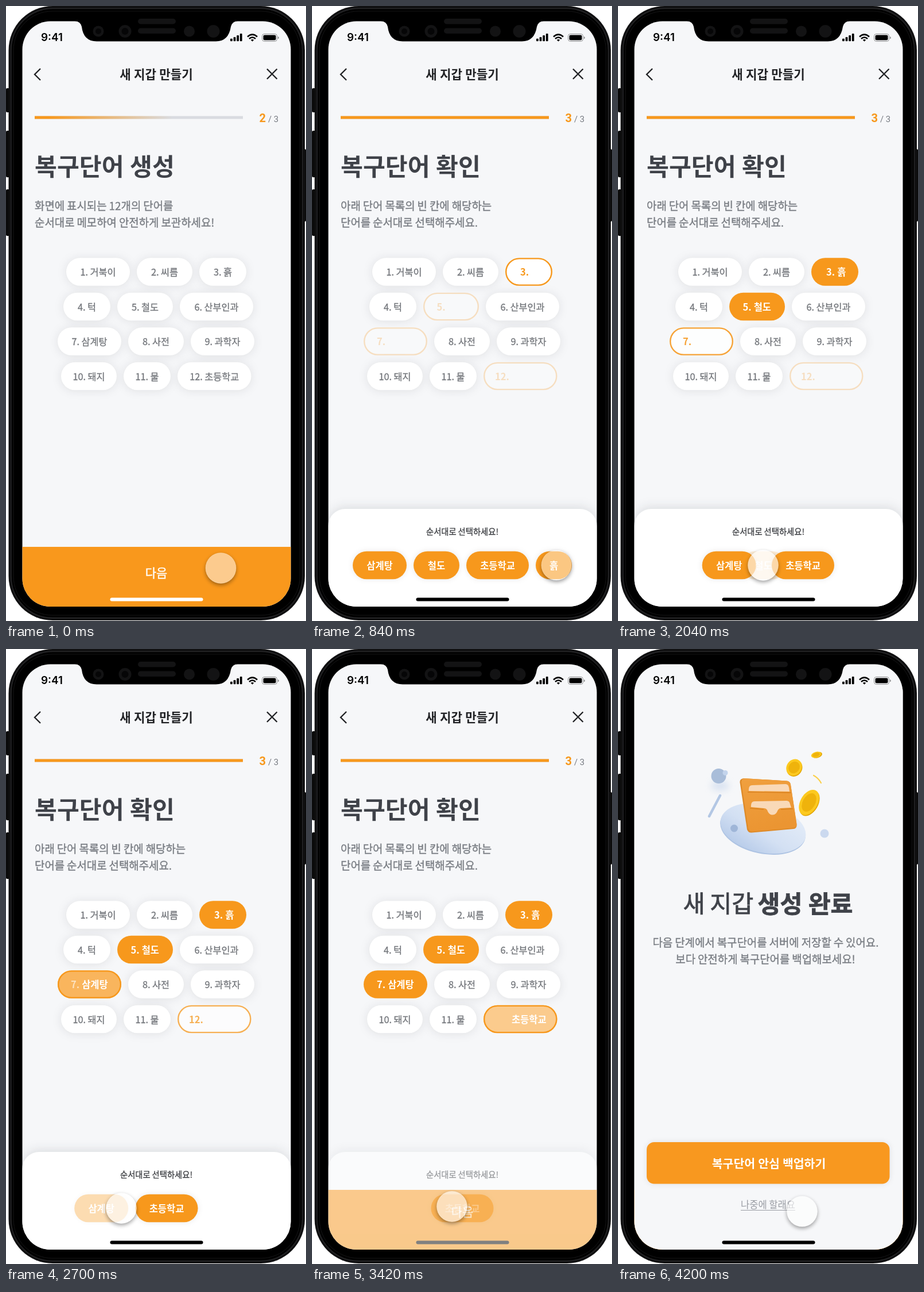
Animation of 523 by 1070 pixels, one loop 6200 ms. Source, as an HTML page:

```html
<!DOCTYPE html>
<html lang="ko">
<head>
<meta charset="utf-8">
<title>새 지갑 만들기</title>
<style>
  html, body { margin: 0; width: 100%; height: 100%; overflow: hidden; background: #fff; }
  svg { display: block; width: 523px; height: 1070px; }
  text { font-family: "Noto Sans CJK KR", "Noto Sans CJK", sans-serif; white-space: pre; word-spacing: -.07em; }
  text[font-weight="700"] { word-spacing: -.035em; }
  .halo { filter: drop-shadow(0 1px 8px rgba(20, 24, 32, .1)); }
  .glow { filter: drop-shadow(0 0 5px rgba(20, 24, 32, .1)); }
  .sheet { filter: drop-shadow(0 -4px 9px rgba(20, 24, 32, .11)); }
</style>
</head>
<body>
<svg viewBox="0 0 523 1070" xmlns="http://www.w3.org/2000/svg">
  <defs>
    <clipPath id="screen"><rect x="28.500" y="26.500" width="468" height="1018.500" rx="49"/></clipPath>
    <linearGradient id="barFill">
      <stop offset=".1" stop-color="#f7981d"/>
      <stop id="barEnd" offset="1" stop-color="#f7981d"/>
    </linearGradient>
    <linearGradient id="disc" x1=".9" y1="0" x2=".2" y2="1">
      <stop offset="0" stop-color="#e6eef9"/><stop offset=".6" stop-color="#d3e0f3"/><stop offset="1" stop-color="#b4c9e8"/>
    </linearGradient>
    <linearGradient id="leather" x2=".3" y2="1">
      <stop offset="0" stop-color="#f0a03f"/><stop offset="1" stop-color="#eb9532"/>
    </linearGradient>
    <filter id="outerShadow" x="-50%" y="-50%" width="200%" height="200%">
      <feGaussianBlur in="SourceAlpha" stdDeviation="3.5"/>
      <feOffset dy="2.5"/>
      <feComposite in2="SourceAlpha" operator="out"/>
    </filter>
    <filter id="soft" x="-100%" y="-100%" width="300%" height="300%"><feGaussianBlur stdDeviation="6"/></filter>
  </defs>

  <!-- phone body -->
  <g fill="#0a0a0a">
    <rect x="0" y="143" width="9" height="42" rx="2"/>
    <rect x="0" y="217" width="9" height="81" rx="2"/>
    <rect x="0" y="319" width="9" height="81" rx="2"/>
    <rect x="514" y="249" width="9" height="126" rx="2"/>
    <rect x="4.500" y="0" width="516.500" height="1069" rx="77" fill="#101011"/>
    <rect x="9" y="4.500" width="507.500" height="1060" rx="72" fill="#000" stroke="#29292b" stroke-width="1.400"/>
    <rect x="13" y="9" width="499.500" height="1051" rx="68" fill="#000" stroke="#161617"/>
  </g>

  <g clip-path="url(#screen)">
    <rect x="28" y="26" width="469" height="1020" fill="#f6f7f9"/>
    <g id="wizard">
      <g fill="none" stroke="#232427" stroke-width="2.400">
        <path d="M60 109L50 119L60 129"/>
        <path d="M455 109.500L472.500 127M472.500 109.500L455 127"/>
      </g>
      <rect x="50" y="191.500" width="363" height="5" fill="#d9dbe0"/>
      <rect id="bar" x="50" y="191.500" height="5" fill="url(#barFill)"/>
      <g id="head"></g>
      <g id="words"></g>
    </g>
    <g id="sheet">
      <path class="sheet" d="M28 1046V905A30 30 0 0 1 58 875H467A30 30 0 0 1 497 905V1046Z" fill="#fff"/>
    </g>
    <g id="next">
      <rect x="28" y="941" width="469" height="105" fill="#f9981c"/>
    </g>
    <g id="done">
      <rect x="28" y="70" width="469" height="976" fill="#f6f7f9"/>
      <g id="art">
        <ellipse cx="178" cy="238" rx="16" ry="9" fill="#cfdbee" opacity=".7" filter="url(#soft)"/>
        <ellipse cx="252.500" cy="314" rx="75.500" ry="42" transform="rotate(12 252.500 314)" fill="#adc3e3"/>
        <ellipse cx="253" cy="312" rx="75.500" ry="42" transform="rotate(12 253 312)" fill="url(#disc)"/>
        <circle cx="175.500" cy="221" r="13" fill="#a9bdd9"/>
        <circle cx="187" cy="215.500" r="4.500" fill="#c3d4ec"/>
        <circle cx="202.500" cy="312" r="6.500" fill="#9fb6d8"/>
        <circle cx="360" cy="321" r="7.500" fill="#cbd9ef"/>
        <path d="M159 291L178 255" stroke="#b3c7e4" stroke-width="4.500" stroke-linecap="round"/>
        <path d="M341 220Q349 224 354 233" fill="none" stroke="#fbd04c" stroke-width="2.200" stroke-linecap="round"/>
        <path d="M219 225L294 229.500Q300 230 301 236L311.500 306Q312 312 306 313L233 319.500Q227 320 225 314L212.500 232Q212 226 219 225Z" fill="#de8a28"/>
        <path d="M221 225L294 229.500Q300 230 301 236L311.500 304Q312 310 306 311L235 317.500Q229 318 227 312L215 232Q215 226 221 225Z" fill="url(#leather)"/>
        <g fill="#f9d9b8">
          <path d="M228 247Q227 237 234 237L292 235Q297 235 298 241L299 248Z"/>
          <path d="M232 275Q231 265 238 265L294 264Q299 264 300 270L302 276L283 277Q279 278 277 284Q273 290 266 288Q262 286 260 280Q258 277 254 277Z"/>
        </g>
        <path d="M226 249L302 250M230 277L254 279M284 279L305 278" stroke="#d98322" stroke-width="1.400" fill="none"/>
        <g id="coins"></g>
      </g>
      <rect class="glow" x="50" y="858" width="423.500" height="72.500" rx="13" fill="#f8981f"/>
    </g>
    <rect id="home" x="181.500" y="1029.500" width="162" height="6" rx="3"/>
    <circle id="shade" filter="url(#outerShadow)" opacity=".38"/>
    <circle id="cursor" fill="#fff" stroke="#fff" stroke-opacity=".3"/>
  </g>

  <!-- notch -->
  <path d="M120 26Q130 27 132 36Q135 61.500 158 61.500H366Q388 61.500 392 36Q394 27 404 26Z"/>
  <g fill="#131314">
    <rect x="230" y="22" width="66" height="9.500" rx="4.700"/><rect x="230" y="38.500" width="66" height="9.500" rx="4.700"/>
    <circle cx="161" cy="44" r="9.500"/><circle cx="207.500" cy="44" r="11"/>
    <circle cx="319.500" cy="44" r="9.500"/><circle cx="361.500" cy="44" r="11"/>
    <g fill="#060607"><circle cx="161" cy="44" r="5"/><circle cx="207.500" cy="44" r="6"/></g>
  </g>

  <!-- status bar -->
  <text x="61" y="61.300" style="font-family:Inter,sans-serif" font-size="18.800" font-weight="600" fill="#000">9:41</text>
  <g id="signal"></g>
  <g fill="none" stroke="#000" stroke-width="2.600">
    <path d="M421 53.500Q429.500 45.800 438 53.500"/><path d="M424 57Q429.500 52 435 57"/>
    <path d="M426.800 59L429.500 61.800L432.200 59Q429.500 57 426.800 59Z" fill="#000" stroke="none"/>
  </g>
  <rect x="446.500" y="48.500" width="26" height="13" rx="4" fill="none" stroke="#000" stroke-opacity=".4"/>
  <rect x="448.500" y="50.500" width="22" height="9" rx="2.300"/>
  <path d="M474 53V57.500Q475.800 56.800 475.800 55.200Q475.800 53.600 474 53Z" fill="#000" opacity=".45"/>
</svg>
<script>
const NS = 'http://www.w3.org/2000/svg';
const ORANGE = '#f7981c', GREY = '#7a7e84', INK = '#3f4249';
const STEP = 60, LAST = 4200, LOOP = 6200;
const $ = id => document.getElementById(id);

function add(parent, tag, attrs = {}) {
  const el = document.createElementNS(NS, tag);
  for (const k in attrs) el.setAttribute(k, attrs[k]);
  return parent.appendChild(el);
}
// Text placed by the middle of its line; a thin stroke stands in for the 500 and 900 weights
function label(parent, str, x, cy, size, fill, weight = 400, anchor = 'start') {
  const el = add(parent, 'text', {
    x, y: cy + size * .375, 'font-size': size, fill, 'text-anchor': anchor,
    'font-weight': weight < 600 ? 400 : 700
  });
  if (weight === 500 || weight === 900) {
    el.setAttribute('stroke', fill);
    el.setAttribute('stroke-width', size * .02);
  }
  el.textContent = str;
  return el;
}
const pill = (parent, x, cy, w, attrs) =>
  add(parent, 'rect', { x, y: cy - 24.3, width: w, height: 48.6, rx: 24.3, ...attrs });
const fade = (el, v) => el.setAttribute('opacity', v);
const clamp = v => Math.max(0, Math.min(1, v));
const out = u => 1 - (1 - u) ** 2;
const smooth = u => u * u * (3 - 2 * u);
const mix = (a, b, p) => a + (b - a) * p;

// Header and titles
const head = $('head');
label(head, '새 지갑 만들기', 262, 119, 21.2, '#222326', 700, 'middle');
const titles = ['생성', '확인'].map(w => label(head, '복구단어 ' + w, 50, 279.5, 42.3, INK, 700));
const notes = [
  ['화면에 표시되는 12개의 단어를', '순서대로 메모하여 안전하게 보관하세요!'],
  ['아래 단어 목록의 빈 칸에 해당하는', '단어를 순서대로 선택해주세요.']
].map(lines => {
  const g = add(head, 'g');
  lines.forEach((s, i) => label(g, s, 50, 348 + 29 * i, 18.9, GREY, 500));
  return g;
});
const count = add(head, 'text', {
  x: 441.5, y: 201.5, 'font-size': 20, 'font-weight': 700, fill: ORANGE, style: 'font-family:Roboto,sans-serif'
});
add(head, 'text', {
  x: 457, y: 201.5, 'font-size': 14.8, fill: '#777b82', style: 'font-family:Roboto,sans-serif;word-spacing:0'
}).textContent = '/ 3';

// Word grid: [word, left, width]
const rows = [
  [['거북이', 105, 111], ['씨름', 228, 97], ['흙', 337, 82]],
  [['턱', 100, 82], ['철도', 194, 97], ['산부인과', 303, 128]],
  [['삼계탕', 90, 111], ['사전', 213, 97], ['과학자', 322, 111]],
  [['돼지', 96, 97], ['물', 205, 82], ['초등학교', 299, 128.5]]
];
const blankX = { 3: 363, 5: 217.5, 7: 113, 12: 319 };
const plainText = [], blanks = [];
rows.forEach((row, r) => row.forEach(([word, x, w], c) => {
  const n = r * 3 + c + 1, cy = 462.5 + 60.5 * r, g = add($('words'), 'g');
  const open = add(g, 'g'), full = add(g, 'g'), plain = add(g, 'g');
  pill(plain, x, cy, w, { fill: '#fff', class: 'halo' });
  const t = label(plain, `${n}. ${word}`, x + w / 2, cy + .7, 16.3, '#74777c', 500, 'middle');
  if (!blankX[n]) return plainText.push(t);
  add(open, 'rect', {
    x: x + 1.2, y: cy - 23.1, width: w - 2.4, height: 46.2, rx: 23.1,
    fill: '#fff', stroke: ORANGE, 'stroke-width': 2.4
  });
  label(open, `${n}.`, blankX[n], cy + .7, 16.5, ORANGE, 700);
  pill(full, x, cy, w, { fill: ORANGE });
  label(full, `${n}. ${word}`, blankX[n], cy + .7, 16.5, '#fff', 700);
  blanks.push({ plain, open, full });
}));

// Bottom bar and sheet
const nextText = label($('next'), '다음', 262, 986, 20.9, '#fff', 500, 'middle');
label($('sheet'), '순서대로 선택하세요!', 262, 915, 14.3, '#3a3c40', 500, 'middle');
// xs: left edge after each pick; a picked chip fades during its last move
const choices = [
  ['삼계탕', 94, [71, 107.5, 154.5, 101]],
  ['철도', 80, [177, 213.5, 213.5]],
  ['초등학교', 109, [269, 305.5, 260.5, 207.5]],
  ['흙', 63, [390, 426.5]]
].map(([word, w, xs]) => {
  const g = add($('sheet'), 'g');
  pill(g, 0, 973, w, { fill: ORANGE, class: 'glow' });
  label(g, word, w / 2, 973.5, 16.5, '#fff', 700, 'middle');
  return { g, xs, gone: word === '초등학교' ? 9 : xs.length - 1 };
});

// Final page
const done = $('done');
label(done, '새 지갑', 113.5, 443, 41.3, INK, 500);
label(done, '생성 완료', 243.5, 443, 42.3, INK, 900);
label(done, '다음 단계에서 복구단어를 서버에 저장할 수 있어요.', 257.5, 511, 18.9, GREY, 500, 'middle');
label(done, '보다 안전하게 복구단어를 백업해보세요!', 257, 540, 18.9, GREY, 500, 'middle');
label(done, '복구단어 안심 백업하기', 263, 895, 20.5, '#fff', 700, 'middle');
label(done, '나중에 할래요', 261.5, 967, 16.6, '#9a9da4', 400, 'middle');
add(done, 'rect', { x: 214, y: 976, width: 95, height: 1, fill: '#9a9da4' });
[[307, 206, 13, 15, 35], [345.5, 184, 9, 5, -15], [333, 267, 15, 24, 30]].forEach(([x, y, rx, ry, turn]) => {
  const g = add($('coins'), 'g', { transform: `translate(${x} ${y}) rotate(${turn})` });
  add(g, 'ellipse', { cx: 1.5, cy: .8, rx, ry, fill: '#e2a400' });
  add(g, 'ellipse', { rx, ry, fill: '#fcc91f' });
  add(g, 'ellipse', { rx: rx * .72, ry: ry * .72, fill: '#efb30c' });
});
for (let i = 0; i < 4; i++) {
  const h = 4.5 + 2.9 * i;
  add($('signal'), 'rect', { x: 391 + 5.6 * i, y: 61.3 - h, width: 3.8, height: h, rx: 1 });
}

// Taps: [start, duration]; moves: [from, to, x, y]
const taps = [[70, 600], [900, 600], [1685, 600], [2450, 600], [3250, 580], [3960, 240]];
const moves = [
  [560, 840, 426, 973], [1420, 1620, 253, 973], [2100, 2400, 201, 973],
  [2900, 3180, 244, 970], [3560, 3820, 321, 978.5]
];

function drawCursor(t) {
  const idle = .5, tapped = .62;
  let x = 374.5, y = 978, veil = idle, press = 0;
  taps.forEach(([s], k) => {
    if (t >= s) veil = mix(idle, tapped, clamp((t - s) / 200));
    if (k) press = Math.max(press, 1 - Math.abs(t - s + 10) / 70);
  });
  moves.forEach(([a, b, mx, my], k) => {
    const p = smooth(clamp((t - a) / (b - a)));
    x = mix(x, mx, p);
    y = mix(y, my, p);
    if (t >= a && t < taps[k + 1][0]) veil = mix(tapped, idle, p);
  });
  for (const el of [$('shade'), $('cursor')]) {
    el.setAttribute('cx', x);
    el.setAttribute('cy', y);
    el.setAttribute('r', 26.5 - 1.5 * press);
  }
  $('cursor').setAttribute('fill-opacity', mix(veil, .33, press));
}

function draw(t) {
  const u = taps.map(([s, d]) => clamp((t - s) / d));
  const p = u.map(out), enter = u[0] ** .75, end = u[5], late = t >= STEP;

  $('bar').setAttribute('width', mix(240, 363, p[0]));
  $('barEnd').setAttribute('stop-opacity', clamp(p[0] * 1.4));
  fade(titles[0], 1 - enter);
  fade(titles[1], enter);
  fade(notes[0], late ? 0 : 1);
  fade(notes[1], late ? 1 : 0);
  count.textContent = late ? '3' : '2';
  plainText.forEach(el => fade(el, 1 - .9 * enter * (1 - enter)));

  blanks.forEach(({ plain, open, full }, i) => {
    const filled = clamp(u[i + 1] * 1.7);
    fade(plain, 1 - enter);
    fade(open, filled < 1 ? enter * (i ? mix(.25, 1, p[i]) : 1) : 0);
    fade(full, filled);
  });

  choices.forEach(({ g, xs, gone }) => {
    let x = xs[0];
    for (let k = 1; k < xs.length; k++) x = mix(x, xs[k], p[k]);
    g.setAttribute('transform', `translate(${x} 0)`);
    fade(g, gone < 9 ? 1 - p[gone] : 1);
  });

  const back = u[4] > 0, sheet = back ? 1 - p[4] : enter;
  fade($('next'), 1 - sheet);
  fade($('sheet'), sheet);
  nextText.setAttribute('y', (back ? 979 : 986) + 20.9 * .375);
  fade(done, end);
  const tone = Math.round(255 * (1 - Math.max(sheet, end)));
  $('home').setAttribute('fill', `rgb(${tone},${tone},${tone})`);
  drawCursor(t);
}

const began = performance.now();
function tick() {
  const t = (performance.now() - began) % LOOP;
  draw(Math.min(LAST, Math.floor(t / STEP) * STEP));
  requestAnimationFrame(tick);
}
tick();
</script>
</body>
</html>
```
